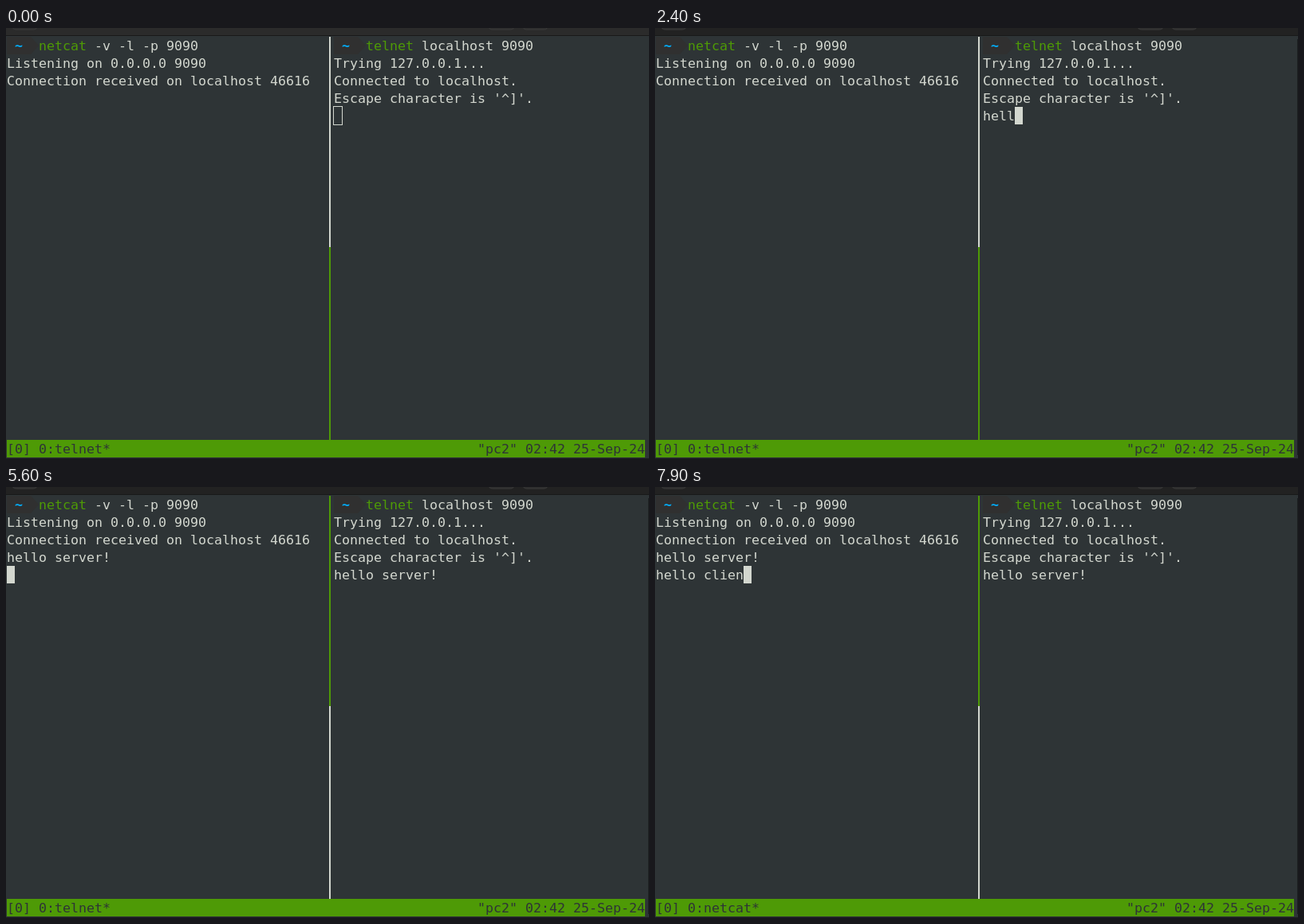
Recreate the animation shown at these times as an HTML page. Size 806 px wide and 541 px high, loop 8000 ms.

```html
<!DOCTYPE html>
<html lang="en">
<head>
<meta charset="utf-8">
<title>Terminal session</title>
<style>
  html, body { margin: 0; width: 100%; height: 100%; overflow: hidden; background: #2e3436; }
  svg { display: block; }
  text {
    font: 16.61px "DejaVu Sans Mono", "Noto Sans Mono", monospace;
    white-space: pre;
    font-variant-ligatures: none;
    fill: #d3d7cf;
  }
  .cmd { fill: #4e9a06; }
  .dir { fill: #00afff; font-weight: bold; }
  .bar { fill: #2e3436; }
</style>
</head>
<body>
<svg id="stage" width="806" height="541" viewBox="0 0 806 541"></svg>
<script>
const LOOP = 8000, CELL_W = 10, CELL_H = 22, LEFT = 1, TOP = 11, RIGHT = 41;
const FG = '#d3d7cf', BG = '#2e3436', GREEN = '#4e9a06';
const stage = document.getElementById('stage');

const colX = col => LEFT + col * CELL_W;
const rowY = row => TOP + row * CELL_H;

function add(tag, attrs, content = '') {
  const el = document.createElementNS('http://www.w3.org/2000/svg', tag);
  for (const key in attrs) el.setAttribute(key, attrs[key]);
  el.textContent = content;
  return stage.appendChild(el);
}
const box = (x, y, width, height, fill, more) => add('rect', { x, y, width, height, fill, ...more });
const print = (col, row, str, cls = '') =>
  add('text', { x: colX(col), y: rowY(row) + 17, class: cls }, str);

function prompt(col, cmd, args) {
  const x = colX(col);
  box(x, TOP, 30, CELL_H, '#303030');
  add('path', { d: `M${x + 30} ${TOP}l10 11l-10 11z`, fill: '#303030' });
  print(col + 1, 0, '~', 'dir');
  print(col + 4, 0, cmd, 'cmd');
  print(col + 5 + cmd.length, 0, args);
}

// Window frame
box(0, 0, 806, 541, BG);
const title = box(0, 0, 806, 10, '#2b2b2b');
for (const [x, w] of [[7, 33], [604, 34], [647, 33]])
  box(x + .5, -20, w - 1, 22, '#2e2e2e', { rx: 5, stroke: '#3b3b3b' });
box(0, 9, 806, 1, '#191919');
box(0, 540, 806, 1, '#1c1f20');
const edge = box(805, 14, 1, 522, '#1c1f20');

// Panes
prompt(0, 'netcat', '-v -l -p 9090');
print(0, 1, 'Listening on 0.0.0.0 9090');
print(0, 2, 'Connection received on localhost 46616');
prompt(RIGHT, 'telnet', 'localhost 9090');
print(RIGHT, 1, 'Trying 127.0.0.1...');
print(RIGHT, 2, 'Connected to localhost.');
print(RIGHT, 3, "Escape character is '^]'.");
const upper = box(405, TOP, 2, 264, FG);
const lower = box(405, 275, 2, 242, GREEN);

// Status bar
box(LEFT, rowY(23), 800, CELL_H, GREEN);
const job = print(0, 23, '', 'bar');
print(59, 23, '"pc2" 02:42 25-Sep-24', 'bar');

// Moving parts
const sent = print(RIGHT, 4, '');
const received = print(0, 3, '');
const reply = print(0, 4, '');
const block = box(0, 0, CELL_W, CELL_H, FG);
const hollow = box(410.5, 98.5, 11, 23, 'none', { stroke: FG });
const pointer = add('path', {
  d: 'M.5 .5V15.4L4 12.2L6.6 18L9.2 16.9L6.7 11.2H11.4Z',
  fill: '#1a1a1a', stroke: '#fff', 'stroke-width': 1.1, 'stroke-linejoin': 'round'
});

const FOCUS = 600, SEND = 5000, SWITCH = 5600, RENAME = 6000;
const hello = 'hello server!', answer = 'hello clien';
const helloKeys = [2100, 2200, 2300, 2400, 2600, 2800, 3600, 3700, 3800, 4100, 4300, 4400, 4800];
const answerKeys = [6000, 6100, 6200, 6300, 6400, 6600, 6900, 7100, 7700, 7800, 7900];
const blinks = [[1500, 2100], [3400, 3600]];
const path = [[600, 700, 330], [700, 655, 260], [800, 630, 221], [900, 619, 202]];

const within = (t, from, to) => t >= from && t < to;
const typed = (str, keys, t) => str.slice(0, keys.filter(k => k <= t).length);
const show = (el, on) => el.setAttribute('visibility', on ? 'visible' : 'hidden');
const move = (el, col, row) => {
  el.setAttribute('x', colX(col));
  el.setAttribute('y', rowY(row));
};

function draw(t) {
  const focused = t >= FOCUS, onLeft = t >= SWITCH;
  title.setAttribute('fill', focused ? '#222222' : '#2b2b2b');
  show(edge, focused);
  show(hollow, !focused);
  upper.setAttribute('fill', onLeft ? GREEN : FG);
  lower.setAttribute('fill', onLeft ? FG : GREEN);
  job.textContent = `[0] 0:${t < RENAME ? 'telnet' : 'netcat'}*`;

  sent.textContent = typed(hello, helloKeys, t);
  received.textContent = t >= SEND ? hello : '';
  reply.textContent = typed(answer, answerKeys, t);

  if (onLeft) move(block, reply.textContent.length, 4);
  else if (t >= SEND) move(block, RIGHT, 5);
  else move(block, RIGHT + sent.textContent.length, 4);
  show(block, focused && !blinks.some(([from, to]) => within(t, from, to)));

  const spot = path.filter(p => p[0] <= t).pop() || path[0];
  pointer.setAttribute('transform', `translate(${spot[1]} ${spot[2]})`);
  show(pointer, within(t, FOCUS, helloKeys[0]));
}

const start = performance.now();
function tick() {
  draw((performance.now() - start) % LOOP);
  requestAnimationFrame(tick);
}
tick();
</script>
</body>
</html>
```
